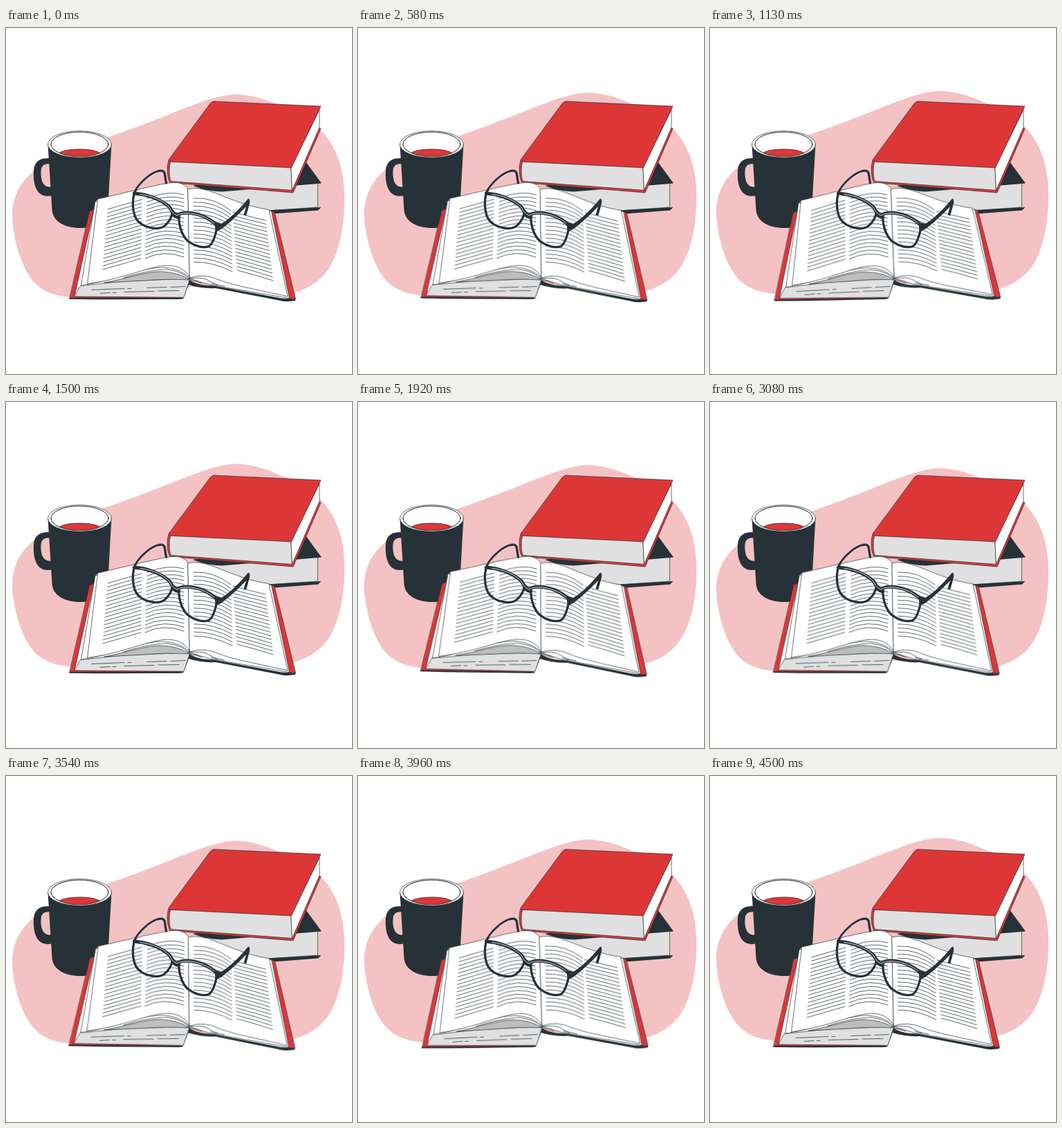
Write an HTML page that moves like this. It is 500 px wide and 500 px high and loops after 4.54 s.

```html
<!DOCTYPE html>
<html lang="en">
<head>
<meta charset="utf-8">
<title>Reading desk</title>
<style>
  html, body { margin: 0; width: 100%; height: 100%; overflow: hidden; background: #fff; }
  svg { display: block; width: 100vw; height: 100vh; }
  path, ellipse { stroke-linejoin: round; stroke-linecap: round; }
  .ink { fill: #263238; }
  .red { fill: #dd3636; }
  .white { fill: #fff; }
  .grey { fill: #e0e0e0; }
  .shade { fill: #bdbdbd; }
  .edge { stroke: #263238; stroke-width: .7; }
  .line { fill: none; stroke: #263238; stroke-width: .75; }
  .frame { fill: none; stroke: #263238; stroke-width: 3.3; }
  .bar { stroke-width: 5; }
  .shine { fill: none; stroke: #fff; stroke-width: .8; }

  #blob { fill: #f4c2c3; animation: float 4.54s linear infinite; }
  #book { transform-origin: 255px 310px; animation: sway 4.54s linear infinite; }

  /* 3 s bob and 1.5 s sway, both cut at 4.54 s */
  @keyframes float {
    0%, 66.08% { transform: translateY(0); }
    33.04%, 99.12% { transform: translateY(-6.67px); }
    100% { transform: translateY(-6.49px); }
  }
  @keyframes sway {
    0%, 99.12% { transform: rotate(0deg); }
    8.26%, 41.3%, 74.34% { transform: rotate(1deg); }
    24.78%, 57.82%, 90.86% { transform: rotate(-1deg); }
    100% { transform: rotate(.107deg); }
  }
</style>
</head>
<body>
<svg viewBox="0 0 500 500">
  <defs>
    <clipPath id="inside"><ellipse cx="106.5" cy="168" rx="41.5" ry="17.8"/></clipPath>
  </defs>

  <path id="blob" d="M332 96.1C294 96 226 132 150 157C106 172 66 185 40 207C20 223 8 246 9 275C11 305 20 340 37 363C50 380 70 387 92 389C130 390 180 374 255 374S390 388 418 382C437 377 456 364 467 347C485 318 490 276 489 238C488 204 478 170 453 146C437 130 411 118 388 109C368 101 350 96.1 332 96.1Z"/>

  <g id="mug">
    <path class="ink" fill-rule="evenodd" d="M65 188.500C51 187 41 191 40 207C39 228 45 244 62 243L71 241ZM64 196.500C55 195.500 51 199 50.500 207C50 221 54 231 66 229.500Z"/>
    <path class="ink" d="M60.500 168L66.500 262C67 279 84 289 108 289C130 289 146 280 147 264L152.500 168Z"/>
    <ellipse class="white edge" cx="106.500" cy="168" rx="46" ry="19.300"/>
    <ellipse class="white edge" cx="106.500" cy="168" rx="41.500" ry="17.800"/>
    <ellipse class="red edge" cx="106.500" cy="183" rx="31" ry="8" clip-path="url(#inside)"/>
    <ellipse class="line" cx="106.500" cy="168" rx="41.500" ry="17.800"/>
  </g>

  <g id="stack">
    <path class="grey edge" d="M276 234L450.500 224V259L378 264L285 250Z"/>
    <path class="ink" d="M433 193L456 224.500L312 236.500Q290 236 270 228Z"/>
    <path class="ink" d="M378 263.500L455.500 259L451 263.500L386 268.500Z"/>
    <path class="red edge" d="M235 191C232 200 232.500 217 237 223.500L415 238L455 145.500L448 142L400 190Z"/>
    <path class="grey edge" d="M238 193C235 200 235.500 217 238.500 221.500L413.500 234.500L412 201Z"/>
    <path class="white edge" d="M412 201L453 118V143.500L413.500 234.500Z"/>
    <path class="red edge" d="M301 106L455 113L412.500 202L241 193.500Q233 193 236 189L294 110.500Q297 105.700 301 106Z"/>
  </g>

  <g id="book">
    <path class="red edge" d="M121 264.500L128 262L110 386L254 389L252 391.500L92 391Z"/>
    <path class="ink" d="M91.500 389.800L256 389.800L265 364L270 367Q280 372 300 372.500L398 390.500L418.500 391.500L418 394Q404 396.500 394 393.500L303 376Q282 377 264 371L256 391.500Q170 393 91.500 391.800Z"/>
    <path class="red edge" d="M382 264L388 266L418.500 391.500L408 391Z"/>
    <path class="white edge" d="M133 247L129 251L127 262L99 388L140 380L266 362L294 371L409.500 390.500L383.500 264.500L300 250Z"/>
    <path class="grey edge" d="M108 372.500L170 366L266 362L257 389.300L99 388Z"/>
    <path class="shade edge" d="M142 368C176 362 200 352 224 352Q250 353 265 364Q235 362 200 365Z"/>
    <path class="white edge" d="M129 251L108.500 372C150 367 195 346 227 346Q252 347 266 362L262 240Z"/>
    <path class="line" d="M170 361C205 350 225 349 233 349Q254 351 265.500 363"/>
    <path class="white edge" d="M133 247C165 240 206 229 235 224Q256 221 263 232L265.500 361C259 347 244 342 229 343.500C205 345 165 364 118 369.500Z"/>
    <path class="white edge" d="M263 233Q272 230 289 234C313 241 341 257 380 262.500L407 388C369 379 331 373 308 364Q287 354 265.500 361Z"/>
    <path class="line" d="M266 362Q282 360 289 363C297 367 301 371 316 373M266 364Q277 366 283 369M296 369L306 372"/>
    <path class="line" d="M124 378.500L171 376.500M176 376.500H181M204 375.500L232 374.500M238 374.500L259 373.500M136 383.500L150 382.500M154 382.500H159M171 381.500L214 380.500M220 380L250 379.500"/>
    <path id="text" class="line"/>
  </g>

  <g id="glasses">
    <path class="frame" d="M185 239C191 226 207 210 221 206.500Q227 205 229 209L231.500 224"/>
    <path class="shine" d="M190 233C198 221 210 212 219 209"/>
    <path class="frame" d="M185 240C182 253 183 262 186 271C189 280 195 284 203 287C212 290 222 291 229 286C235 281 241 272 240 265"/>
    <path class="frame" d="M250 271C249 284 254 300 263 308C271 314 284 319 293 315.500C299 312 302 302 304.500 290"/>
    <path class="frame bar" d="M185.500 239C201 240 222 246 236.500 259Q240 267 247 271Q252 267 260 267C277 267 293 274 306 286"/>
    <path class="frame" d="M240 269Q245 275 250.500 274"/>
    <path class="ink" d="M301 280L311 283Q328 273 350 246.500Q353 247 352 253Q350 262 347 271.500L343.500 270L347 258Q330 276 312 290L303 295Z"/>
    <path class="shine" d="M194 240.500C210 242 227 249 236 259Q240 268 247 271Q252 267.500 260 267.500C277 267.500 291 274 301 282"/>
  </g>
</svg>
<script>
  // Each column: first and last line as start, control and end points.
  const columns = [
    [[147, 262, 170, 255, 196, 248], [140, 349, 168, 341, 195, 333]],
    [[204, 246, 235, 234, 257, 241], [201, 333, 228, 320, 257, 331]],
    [[271, 246, 300, 244, 325, 264], [272, 338, 300, 338, 327, 352]],
    [[328, 266, 350, 272, 375, 278], [334, 350, 358, 356, 386, 365]]
  ];
  const rows = 17;
  const mix = (a, b, k) => a.map((v, i) => (v + (b[i] - v) * k).toFixed(1));
  let d = '';
  for (const [first, last] of columns) {
    for (let r = 0; r < rows; r++) {
      const [x, y, ...curve] = mix(first, last, r / (rows - 1));
      d += `M${x} ${y}Q${curve.join(' ')}`;
    }
  }
  document.getElementById('text').setAttribute('d', d);
</script>
</body>
</html>
```
